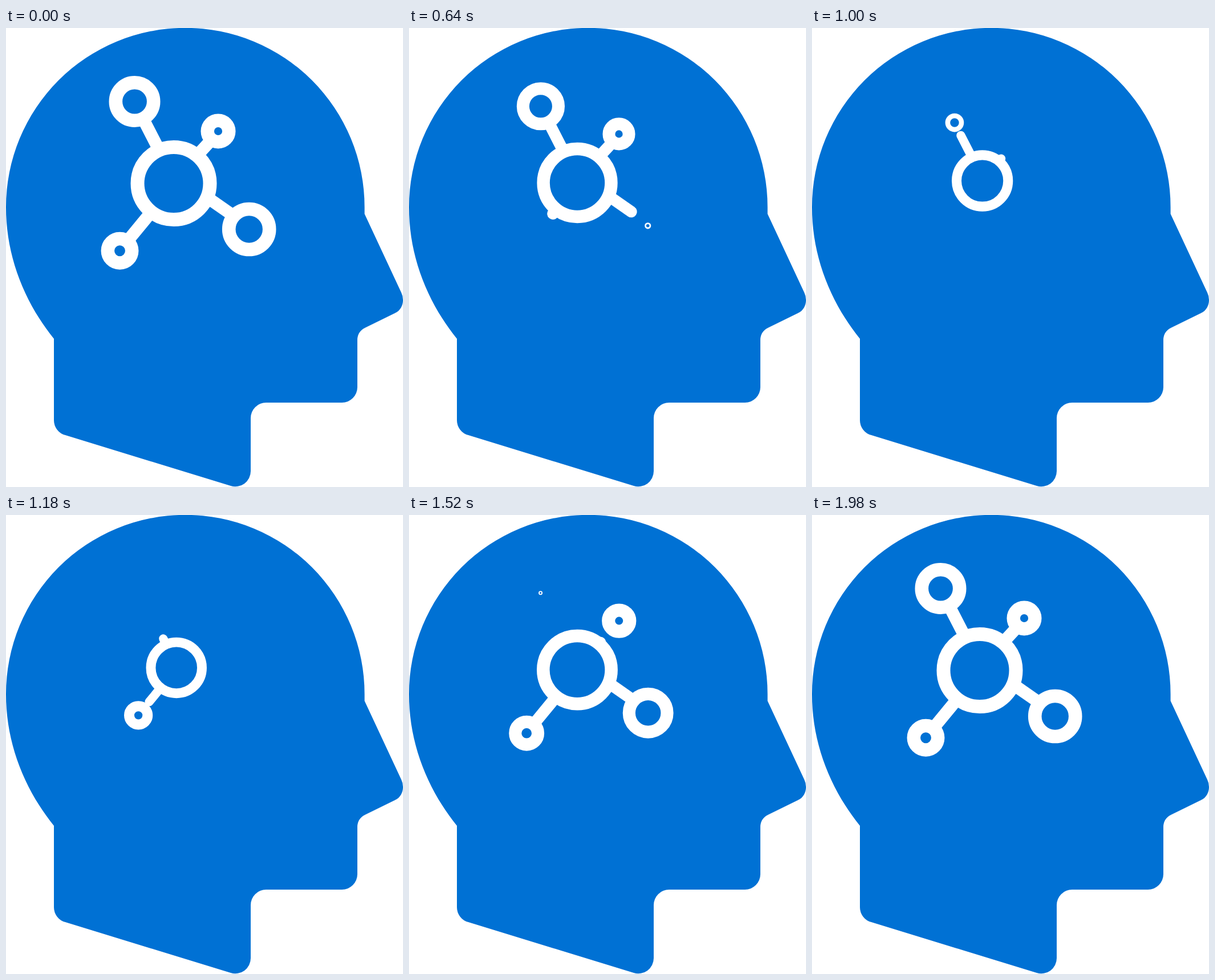
An HTML page for the animation above (2 s loop, 696x805 px).

```html
<!DOCTYPE html>
<html lang="en">
<head>
<meta charset="utf-8">
<title>Thinking head</title>
<style>
  html, body { margin: 0; width: 100%; height: 100%; overflow: hidden; background: #fff; }
  svg { display: block; width: 696px; height: 805px; }
  #net { fill: #0071d4; stroke: #fff; stroke-linecap: round; }
</style>
</head>
<body>
<svg viewBox="0 0 696 805">
  <path fill="#0071d4" d="M84 545C31 479 0 399 0 314A314.3 314.3 0 0 1 628.6 314V326L693 464
    Q696 470 696 477C696 487 691 496 682 500L629 526Q616 533 616 547V630A27 27 0 0 1 589 657
    H456A27 27 0 0 0 429 684V777A27 27 0 0 1 394 803L104 714A27 27 0 0 1 84 688Z"/>
  <g id="net"></g>
</svg>
<script>
const LOOP = 2000, PIVOT = [310, 257], MIN_SCALE = 0.705;
const HUB = { c: [294, 272.5], r: 63.5, w: 24 };
// Listed in the order they leave and return; from/to are the ends of the link.
const NODES = [
  { c: [199.5, 390.8], r: 21.2, w: 23.5, from: [254.9, 322.5], to: [212.6, 374] },
  { c: [426.2, 353], r: 35.5, w: 23.6, from: [353, 297.3], to: [395.5, 327] },
  { c: [372, 181], r: 18.8, w: 23.4, from: [334.9, 223.8], to: [359, 197.5] },
  { c: [225.5, 129], r: 33.2, w: 23.6, from: [268.6, 214.3], to: [241, 160.5] }
];
const net = document.getElementById('net');

function add(tag, attrs) {
  const el = document.createElementNS('http://www.w3.org/2000/svg', tag);
  for (const key in attrs) el.setAttribute(key, attrs[key]);
  return net.appendChild(el);
}
const ring = ({ c, r, w }) => add('circle', { cx: c[0], cy: c[1], r, 'stroke-width': w });

for (const n of NODES) {
  n.link = add('line', { x1: n.from[0], y1: n.from[1], 'stroke-width': 21.6 });
}
ring(HUB);
for (const n of NODES) n.ring = ring(n);

const phase = (t, start, length) => Math.min(1, Math.max(0, (t - start) / length));

// cubic-bezier(.25, .1, .25, 1)
function ease(x) {
  if (x <= 0 || x >= 1) return x;
  let lo = 0, hi = 1;
  for (let i = 0; i < 24; i++) {
    const u = (lo + hi) / 2;
    if (0.75 * u * (1 - u) + u ** 3 < x) lo = u; else hi = u;
  }
  return 0.3 * lo * (1 - lo) ** 2 + 3 * lo * lo * (1 - lo) + lo ** 3;
}

function popIn(p) {
  const q = 1 - p;
  return 1 - q * q * (3.59 * q - 2.59);
}

function nodeScale(t, i) {
  const enter = 1023 + 165 * i, leave = 278 + 185 * i;
  if (t >= enter) return popIn(phase(t, enter, 200));
  const swell = 1.1 - 0.1 * Math.cos(Math.PI * phase(t, leave, 139));
  return swell * (1 - phase(t, leave + 139, 42) ** 1.5);
}

function linkLength(t, i) {
  return 1 - phase(t, 451 + 188 * i, 225) + ease(phase(t, 1110 + 197 * i, 180));
}

const scaleAbout = ([x, y], s) => `translate(${x} ${y}) scale(${s}) translate(${-x} ${-y})`;

function draw(t) {
  const shrink = ease(phase(t, 550, 550)) - ease(phase(t, 1250, 550));
  net.setAttribute('transform', scaleAbout(PIVOT, 1 - (1 - MIN_SCALE) * shrink));
  NODES.forEach((n, i) => {
    const s = nodeScale(t, i), k = linkLength(t, i);
    n.ring.setAttribute('transform', scaleAbout(n.c, s));
    n.ring.setAttribute('visibility', s > 0.001 ? 'visible' : 'hidden');
    n.link.setAttribute('x2', n.from[0] + (n.to[0] - n.from[0]) * k);
    n.link.setAttribute('y2', n.from[1] + (n.to[1] - n.from[1]) * k);
  });
}

const begin = performance.now();
function tick() {
  draw((performance.now() - begin) % LOOP);
  requestAnimationFrame(tick);
}
tick();
</script>
</body>
</html>
```
